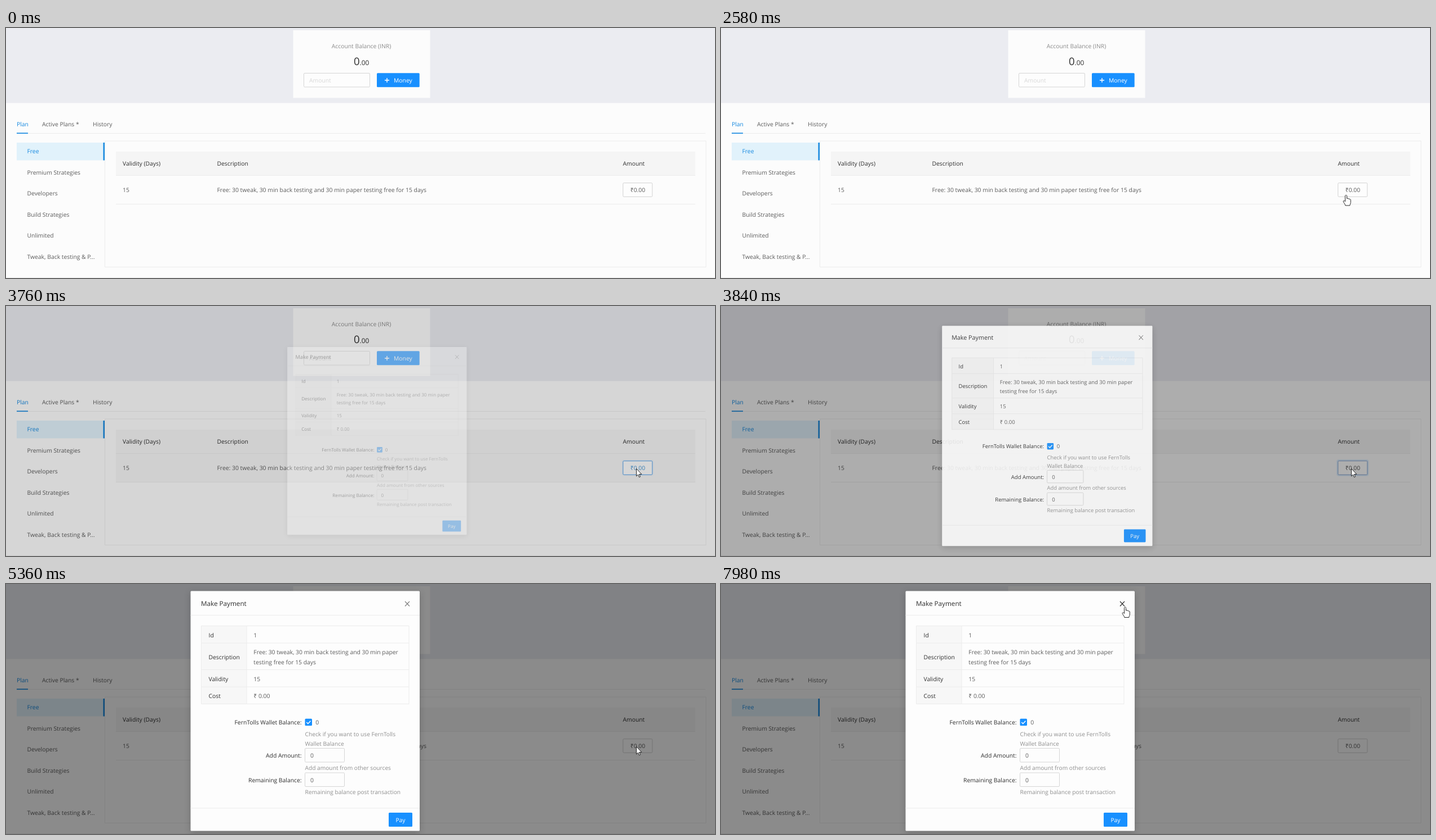
Animation of 1258x445 px, one loop 8 s. Source, as an HTML page:

```html
<!DOCTYPE html>
<html lang="en">
<head>
<meta charset="utf-8">
<title>Plan payment</title>
<style>
html, body { margin: 0; width: 100%; height: 100%; overflow: hidden; background: #fcfcfc; }
svg { display: block; font: 10.35px "Open Sans", "Noto Sans", sans-serif; text-rendering: geometricPrecision; }
text { fill: #5c5c5c; white-space: pre; }
.dark { fill: #2e2e2e; }
.soft { fill: #8c8c8c; }
.help { fill: #8f8f8f; font-size: 10.2px; }
.blue { fill: #1689e0; }
.white { fill: #fff; }
.mid { text-anchor: middle; }
.end { text-anchor: end; }
.btn { fill: #1890ff; }
.field { fill: #fdfdfd; stroke: #d6d6d6; }
.line { fill: none; stroke: #ececec; }
#dialog { filter: drop-shadow(0 3px 6px rgba(0, 0, 0, .2)); }
</style>
</head>
<body>
<svg width="1258" height="445" viewBox="0 0 1258 445">
  <rect width="1258" height="445" fill="#fcfcfc"/>
  <rect width="1258" height="133.5" fill="#ebecf1"/>
  <rect x="509.5" y="4" width="243" height="120.5" fill="#fcfcfc"/>
  <text class="soft mid" x="630.5" y="36">Account Balance (INR)</text>
  <text class="dark" x="617" y="66" font-size="18.5">0<tspan font-size="11.8">.00</tspan></text>
  <rect class="field" x="528.5" y="80.5" width="117" height="24.5" rx="1.5"/>
  <text x="538" y="97" style="fill:#d8d8d8">Amount</text>
  <rect class="btn" x="658" y="80.3" width="75.7" height="25" rx="1.5"/>
  <path d="M672 93h8M676 89v8" stroke="#fff" stroke-width="1.4"/>
  <text class="white" x="688" y="97">Money</text>

  <path class="line" d="M19 187.5H1241M175.5 201V425.5H1242V201H175.5M0 444.5H1258"/>
  <text class="blue" x="19" y="175">Plan</text>
  <text x="64" y="175">Active Plans *</text>
  <text x="154" y="175">History</text>
  <path d="M19 187.3H39" stroke="#1689e0" stroke-width="1.7"/>

  <rect x="19" y="204" width="156" height="31.5" fill="#e1f2fb"/>
  <rect x="172.5" y="204" width="2.5" height="31.5" fill="#1689e0"/>
  <g id="menu"></g>

  <rect x="195" y="220" width="1028" height="43" fill="#f5f5f5"/>
  <text class="dark" x="207" y="245">Validity (Days)</text>
  <text class="dark" x="374.5" y="245">Description</text>
  <text class="dark" x="1094.5" y="245">Amount</text>
  <rect id="row" x="195" y="263" width="1028" height="50.5" fill="#f4f4f4"/>
  <path class="line" d="M195 262.5H1223M195 313.5H1223"/>
  <text x="207" y="292">15</text>
  <text x="374.5" y="292" font-size="10.4">Free: 30 tweak, 30 min back testing and 30 min paper testing free for 15 days</text>
  <rect id="ring" x="1093.5" y="274.5" width="54.5" height="27" rx="2.5" fill="none" stroke="#1890ff" stroke-opacity=".14" stroke-width="2.5"/>
  <rect id="price" x="1094.8" y="275.8" width="52" height="24.5" rx="1.5" fill="#fdfdfd"/>
  <text id="priceText" class="mid" x="1121" y="292">₹0.00</text>

  <rect id="mask" width="1258" height="445"/>

  <g id="dialog">
    <rect x="327.5" y="12.5" width="406.5" height="427" rx="1.5" fill="#fdfdfd"/>
    <text class="dark" x="346" y="39" font-size="11.7">Make Payment</text>
    <path id="close" d="M708 31l8 8.5M716 31l-8 8.5" fill="none" stroke-width="1.1"/>
    <rect x="346.5" y="74.5" width="80.5" height="139" fill="#f7f7f7"/>
    <path class="line" d="M327.5 55.5H734M327.5 399H734M346.5 74.5H715V213.5H346.5ZM427 74.5V213.5M346.5 105H715M346.5 152.5H715M346.5 183H715"/>
    <g id="details"></g>
    <text class="dark end" x="524.5" y="250">FernTolls Wallet Balance:</text>
    <rect class="btn" x="530.5" y="239.8" width="12.5" height="12.5" rx="1.5"/>
    <path d="M533.3 246l2.5 2.7 4.6-5" fill="none" stroke="#fff" stroke-width="1.5"/>
    <text x="549.3" y="250">0</text>
    <text class="help" x="530.5" y="271">Check if you want to use FernTolls</text>
    <text class="help" x="530.5" y="288">Wallet Balance</text>
    <text class="dark end" x="524.5" y="309">Add Amount:</text>
    <rect class="field" x="530.5" y="292.5" width="70" height="24.5" rx="1.5"/>
    <text x="540" y="309">0</text>
    <text class="help" x="530.5" y="330.5">Add amount from other sources</text>
    <text class="dark end" x="524.5" y="353">Remaining Balance:</text>
    <rect class="field" x="530.5" y="336" width="70" height="24.5" rx="1.5"/>
    <text x="540" y="353">0</text>
    <text class="help" x="530.5" y="374">Remaining balance post transaction</text>
    <rect class="btn" x="679" y="407" width="42" height="25" rx="1.5"/>
    <text class="white mid" x="700" y="424">Pay</text>
  </g>

  <g id="cursor" fill="#fff" stroke="#111" stroke-width=".9" stroke-linejoin="round">
    <path id="arrow" d="M0 0V13.4L3 10.6 5 15.3 7 14.4 5 9.9H9.3Z"/>
    <path id="hand" d="M-1.5 1.5C-1.5-.5 1.5-.5 1.5 1.5V6.2c.5-1 2.6-.8 2.7.6 .6-.9 2.2-.6 2.3.8 .7-.6 1.8-.2 1.8 1.2V13c0 2-1.3 3-1.5 5.5H-1.2C-1.5 16-4 13.5-4.8 11.5c-.5-1.5 1.2-2.3 2.2-1.2L-1.5 11.5Z"/>
  </g>
</svg>
<script>
const $ = id => document.getElementById(id);
const label = (x, y, s, cls = '') => `<text class="${cls}" x="${x}" y="${y}">${s}</text>`;

$('menu').innerHTML = ['Free', 'Premium Strategies', 'Developers', 'Build Strategies', 'Unlimited', 'Tweak, Back testing &amp; P...']
  .map((s, i) => label(37.5, 223.3 + 37.5 * i, s, i ? '' : 'blue')).join('');
$('details').innerHTML = [
  ['Id', 94.5, '1', 94.5],
  ['Description', 133.5, 'Free: 30 tweak, 30 min back testing and 30 min paper', 125],
  ['', 0, 'testing free for 15 days', 142.5],
  ['Validity', 172.5, '15', 172.5],
  ['Cost', 203, '₹ 0.00', 203]
].map(([k, ky, v, vy]) => label(359.5, ky, k, 'dark') + label(439.3, vy, v)).join('');

const LOOP = 8000, PRESS = [1118.5, 291];
const GREY = [210, 210, 210], HOVER = [64, 158, 240], FOCUS = [135, 165, 210];
// Pointer stops: time, x, y
const path = [
  [1640, 1062, 446], [2440, 1104, 310], [2580, 1109, 297.5], [2930, 1118.5, 289.5],
  [6310, 1118.5, 289.5], [7110, 742, 66], [7840, 717, 41], [LOOP, 717, 41]
];
const ramp = (t, a, b) => Math.min(1, Math.max(0, (t - a) / (b - a)));
const smooth = u => u * u * (3 - 2 * u);
const lerp = (a, b, u) => a + (b - a) * u;
const mix = (a, b, u) => a.map((v, i) => lerp(v, b[i], u));
const rgb = c => `rgb(${c})`;
const show = (id, on) => $(id).setAttribute('opacity', +on);

function pointer(t) {
  const i = Math.max(1, path.findIndex(p => p[0] > t));
  const [a, b] = [path[i - 1], path[i]];
  const u = smooth(ramp(t, a[0], b[0]));
  return [lerp(a[1], b[1], u), lerp(a[2], b[2], u)];
}

function draw(t) {
  const hover = ramp(t, 2610, 2900);
  const leave = ramp(t, 3740, 3840);
  const blur = ramp(t, 5070, 5360);
  show('row', hover * (1 - leave));
  show('ring', leave * (1 - blur));
  $('price').style.stroke = rgb(mix(GREY, mix(HOVER, FOCUS, leave), hover * (1 - blur)));
  $('priceText').style.fill = rgb(mix([89, 89, 89], [64, 165, 245], hover * (1 - leave)));

  const dim = ramp(t, 3705, 4005);
  show('mask', .45 * dim * (2 - dim));

  const scale = t < 4240 ? 1 - .8 * Math.exp((3654 - t) / 82) : 1;
  const [px, py] = PRESS;
  $('dialog').setAttribute('transform', `translate(${px} ${py}) scale(${Math.max(.01, scale)}) translate(${-px} ${-py})`);
  show('dialog', ramp(t, 3712, 3860));
  $('close').style.stroke = rgb(mix([125, 125, 125], [45, 45, 45], ramp(t, 7500, 7800)));

  const hand = t >= 2500 && t < 3700 || t >= 7500;
  $('cursor').setAttribute('transform', `translate(${pointer(t)})`);
  show('cursor', t >= 1640);
  show('hand', hand);
  show('arrow', !hand);
}

const start = performance.now();
function tick() {
  draw((performance.now() - start) % LOOP);
  requestAnimationFrame(tick);
}
tick();
</script>
</body>
</html>
```
